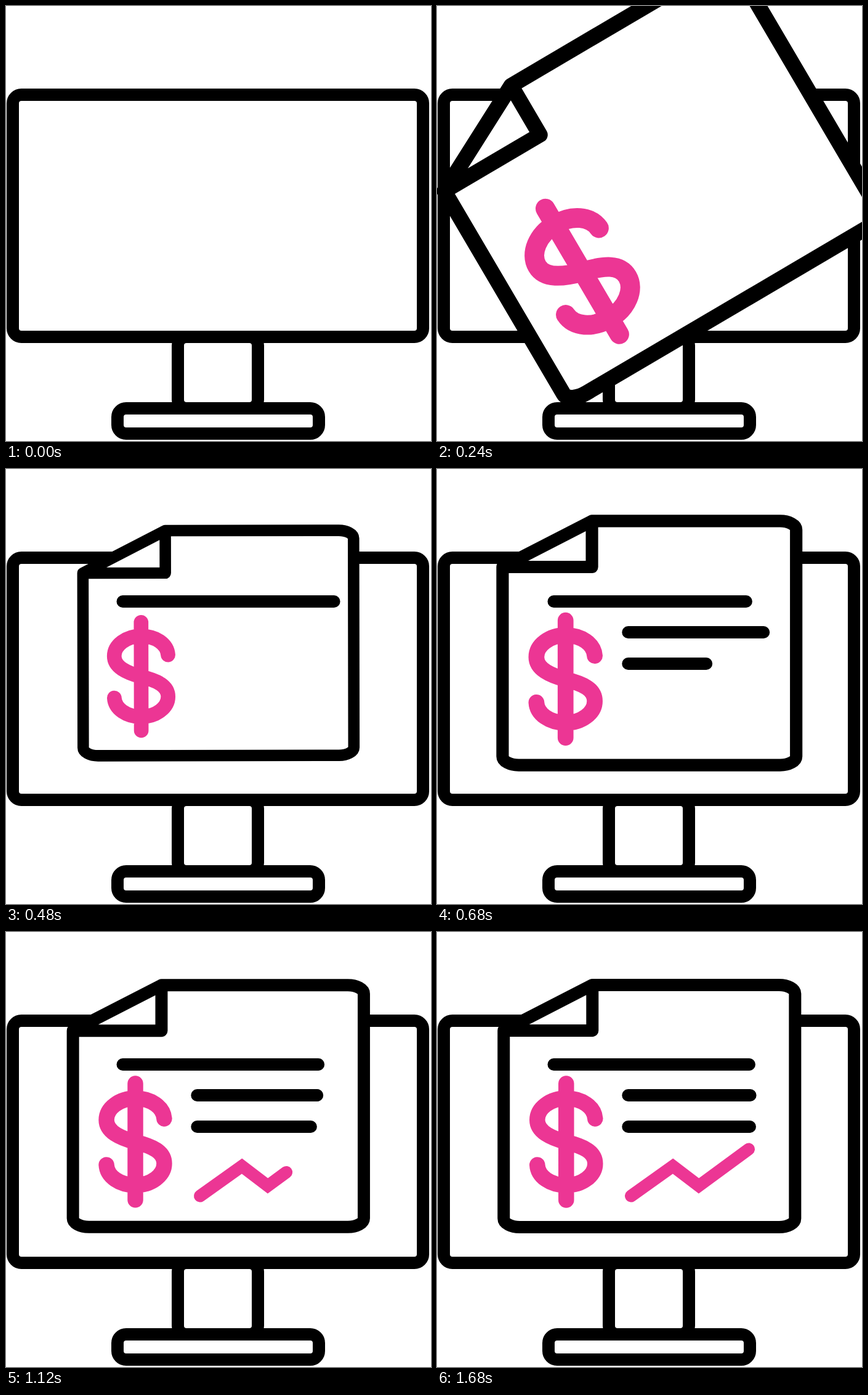
Write an HTML page that moves like this. It is 690 px wide and 706 px high and loops after 1.72 s.

```html
<!DOCTYPE html>
<html lang="en">
<head>
<meta charset="utf-8">
<title>Report on a monitor</title>
<style>
  html, body { margin: 0; height: 100%; overflow: hidden; background: #fff; }
  svg { display: block; width: 100vw; height: 100vh; }
  .ink, .pink { fill: none; stroke: #000; stroke-width: 20; stroke-linecap: round; }
  .pink { stroke: #ec3694; }
  .solid { fill: #fff; stroke-linejoin: round; }
  #dollar { stroke-width: 25.5; }
  #sparks { stroke-width: 4.5; }
</style>
</head>
<body>
<svg viewBox="0 0 690 706">
  <g class="ink">
    <rect x="279" y="537" width="130" height="116" rx="14"/>
    <rect x="11" y="144" width="666" height="393" rx="14"/>
    <rect x="181" y="653" width="327" height="41" rx="14"/>
  </g>
  <g id="doc">
    <path class="ink solid" d="M108 160L252 86H555A26 14 0 0 1 581 100V465A26 14 0 0 1 555 479H134A26 14 0 0 1 108 465ZM252 86V160H108"/>
    <path id="dollar" class="pink" d="M209.5 246V435M256.5 303C255 284 235 270 209.5 270C183.5 270 162.5 286 162.5 305C162.5 324 184 334 209.5 341C238 348 256.5 357 256.5 376C256.5 395 235.5 411 209.5 411C184 411 163.5 397 162.5 378"/>
  </g>
  <path id="lines" class="ink"/>
  <path id="chart" class="pink" stroke-miterlimit="8" pathLength="1" d="M315 428.5L383 380L425 412L506 352.5"/>
  <path id="sparks" class="pink"/>
</svg>
<script>
const LOOP = 1720, STEP = 40;
const $ = id => document.getElementById(id);
const clamp = x => Math.min(1, Math.max(0, x));
const easeOut = x => 1 - (1 - clamp(x)) ** 3;

// Linear rise to 1, then a damped swing around it
function elastic(t, start, duration, amp) {
  const s = (t - start - duration) / 1000;
  if (s < 0) return clamp((t - start) / duration);
  return 1 + amp * Math.exp(-5.1 * s) * Math.sin(12.9 * s);
}

// x, y, length, start, rise time, swing
const lines = [
  [189.5, 215, 317.5, 330, 67, 0.14],
  [310.3, 265, 198, 493, 167, 0.48],
  [310.3, 316, 198, 573, 167, 0.48]
];

function sparkPath(t) {
  const u = (t - 1200) / 360;
  const head = 101 * easeOut(u), tail = 101 * easeOut(u - 0.1);
  if (head - tail < 0.5) return "";
  let d = "";
  for (let i = 0; i < 8; i++) {
    if (i === 3) continue; // no spark towards the lower left
    const a = i * Math.PI / 4;
    const at = r => `${506.5 + r * Math.cos(a)} ${333.5 + r * Math.sin(a)}`;
    d += `M${at(tail)}L${at(head)}`;
  }
  return d;
}

function draw(t) {
  const scale = elastic(t, 30, 146, 0.475);
  const angle = -180 * (1 - easeOut((t - 13) / 508));
  $("doc").setAttribute("transform",
    `translate(344.8 282.5) rotate(${angle}) scale(${scale}) translate(-344.5 -282.5)`);
  $("doc").style.display = scale ? "" : "none";
  $("dollar").style.display = t < 220 ? "none" : "";

  $("lines").setAttribute("d", lines.map(([x, y, length, ...timing]) => {
    const grown = elastic(t, ...timing);
    return grown ? `M${x} ${y}h${length * grown}` : "";
  }).join(""));

  const drawn = clamp((t - 900) / 300);
  $("chart").style.display = drawn ? "" : "none";
  $("chart").style.strokeDasharray = drawn < 1 ? `${drawn} 2` : "none";
  $("sparks").setAttribute("d", sparkPath(t));
}

const origin = performance.now();
function tick() {
  const t = (performance.now() - origin) % LOOP;
  draw(Math.floor(t / STEP) * STEP);
  requestAnimationFrame(tick);
}
tick();
</script>
</body>
</html>
```
